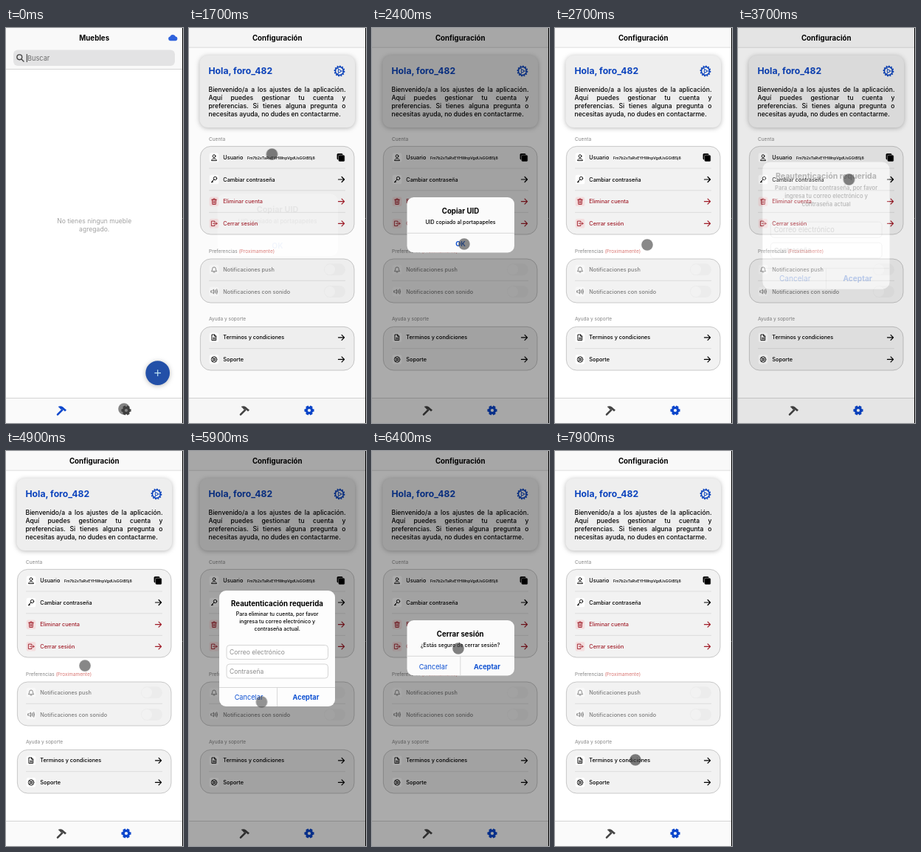
Write an HTML page that moves like this. It is 240 by 532 pixels and loops after 8000 ms.

```html
<!DOCTYPE html>
<html lang="es">
<head>
<meta charset="utf-8">
<title>Muebles</title>
<style>
@property --s { syntax: "<number>"; inherits: true; initial-value: 1; }
html, body { margin: 0; width: 100%; height: 100%; overflow: hidden; background: #fff; }
svg.stage { display: block; width: 240px; height: 532px; font-family: Inter, Roboto, "Liberation Sans", sans-serif; }
.title { font-size: 9.7px; font-weight: 650; text-anchor: middle; }
.empty { font-size: 8.6px; fill: #a2a2a2; text-anchor: middle; }
.hello { font-size: 12.2px; font-weight: 700; fill: #0b43bd; }
.row { font-size: 7.3px; font-weight: 500; }
.uid { font-size: 5.25px; font-weight: 500; }
.sect { font-size: 6.5px; fill: #858585; }
.msg { font-size: 7.05px; font-weight: 500; text-anchor: middle; }
.hint { font-size: 8.5px; fill: #8c8c8c; }
.btn { font-size: 9.2px; fill: #0d50d2; text-anchor: middle; }
.bold { font-weight: 700; }
.red { color: #a01c28; fill: #a01c28; }
.off { opacity: .48; }
.line { fill: none; stroke: currentColor; stroke-width: .9; stroke-linecap: round; stroke-linejoin: round; }
.card { fill: #f2f2f2; stroke: #bcbcbc; stroke-width: .8; }
.sep { stroke: #d9d9d9; stroke-width: .8; }
.tile { fill: #fff; }
.red .tile { fill: #f3dedf; }
.field { fill: #fff; stroke: #cbcbcb; stroke-width: .8; }
.intro { position: relative; font: 450 8.6px/10.7px Inter, Roboto, "Liberation Sans", sans-serif; color: #000; }
.intro div { white-space: nowrap; text-align-last: justify; }
.intro div:last-child { text-align-last: left; }
.lift { filter: drop-shadow(0 1px 3px rgba(0, 0, 0, .28)); }

.home, .config, .modal, .touch { animation: 8s linear infinite; }
.home { animation-name: home; animation-timing-function: step-end; }
.config { animation-name: config; animation-timing-function: step-end; }
@keyframes home { 0% { visibility: visible } 1.2%, 100% { visibility: hidden } }
@keyframes config { 0% { visibility: hidden } 1.2%, 100% { visibility: visible } }

.modal { opacity: 0; }
.box { transform-origin: 120px 265px; transform: scale(var(--s)); }
.copy { animation-name: copy; }
.pass { animation-name: pass; }
.drop { animation-name: drop; }
.exit { animation-name: exit; }
@keyframes copy {
  0%, 21.1% { opacity: 0; --s: 1.13 }
  24.4%, 31.8% { opacity: 1; --s: 1 }
  33.5%, 100% { opacity: 0; --s: 1 }
}
@keyframes pass {
  0%, 45.6% { opacity: 0; --s: 1.13 }
  48.2%, 57.5% { opacity: 1; --s: 1 }
  59.4%, 100% { opacity: 0; --s: 1 }
}
@keyframes drop {
  0%, 66.8% { opacity: 0; --s: 1.13 }
  69.4%, 74.4% { opacity: 1; --s: 1 }
  76%, 100% { opacity: 0; --s: 1 }
}
@keyframes exit {
  0%, 77.4% { opacity: 0; --s: 1.13 }
  79.9%, 90.6% { opacity: 1; --s: 1 }
  92.3%, 100% { opacity: 0; --s: 1 }
}

.touch { fill: #3c3c3c; animation-name: touch; animation-timing-function: ease-in-out; }
@keyframes touch {
  0%, 4% { transform: translate(160px, 513px); opacity: .62 }
  18%, 23% { transform: translate(112.5px, 170px); opacity: .66 }
  30.5%, 34.5% { transform: translate(125px, 292px); opacity: .6 }
  43.5%, 49.5% { transform: translate(150.5px, 204px); opacity: .64 }
  55.5%, 58.5% { transform: translate(82px, 331px); opacity: .6 }
  64.5%, 68.5% { transform: translate(140px, 234px); opacity: .64 }
  72.8%, 74.6% { transform: translate(98.5px, 338px); opacity: .55 }
  77%, 81.5% { transform: translate(117px, 266px); opacity: .64 }
  88%, 91.5% { transform: translate(85px, 291px); opacity: .6 }
  98%, 100% { transform: translate(109px, 416px); opacity: .66 }
}
</style>
</head>
<body>
<svg class="stage" viewBox="0 0 240 532">
  <defs>
    <g id="arrow" fill="none" stroke="currentColor" stroke-width="1.2" stroke-linecap="round" stroke-linejoin="round">
      <path d="M-4 0H4M.6-3.5L4.1 0L.6 3.5"/>
    </g>
    <rect id="tile" x="-6.3" y="-6.3" width="12.6" height="12.6" rx="2.6"/>
    <g id="cog" fill="none" stroke="currentColor">
      <circle r="3.7" stroke-width="3.2"/>
      <circle r="5.4" stroke-width="2.4" pathLength="12" stroke-dasharray="1.25 .75" stroke-dashoffset=".62"/>
    </g>
    <g id="hammer">
      <path d="M1.3-.6L-5 5.6" stroke="currentColor" stroke-width="2.6" stroke-linecap="round"/>
      <path d="M-4.4-4.9Q-1.2-6.8 2.3-4.6L4.5-2.6L7-.5L5 1.5L2.9-.4L1.2-1.9L-.4-.9L-2.2-2.9Q-3-4-4.4-4.9Z" fill="currentColor"/>
    </g>
    <g id="user" class="line">
      <circle cy="-1.9" r="1.9"/><path d="M-3.4 3.7C-3.2.6 3.2.6 3.4 3.7Z"/>
    </g>
    <g id="key" class="line">
      <circle cx="1.5" cy="-1.5" r="2.2"/><path d="M0 0L-3.6 3.6M-3.6 3.6H-2M-2 2V3.2"/>
    </g>
    <g id="trash" class="line">
      <path d="M-3.3-2.5H3.3M-1.1-2.5V-3.7H1.1V-2.5M-2.6-2.5L-2.2 3.8H2.2L2.6-2.5M-.8-.8V2.3M.8-.8V2.3"/>
    </g>
    <g id="leave" class="line">
      <path d="M.8-1.6V-3.2H-3.6V3.2H.8V1.6M-1.3 0H4M2.5-1.6L4 0L2.5 1.6"/>
    </g>
    <g id="bell" class="line">
      <path d="M-3.3 2.1Q-2.3 1-2.3-1A2.3 2.3 0 0 1 2.3-1Q2.3 1 3.3 2.1ZM-.9 3.7H.9"/>
    </g>
    <g id="sound" class="line">
      <path d="M-4-1.1H-2.5L-.5-2.9V2.9L-2.5 1.1H-4ZM1-1.4Q1.9 0 1 1.4M2.4-2.4Q4 0 2.4 2.4M3.8-3.3Q5.8 0 3.8 3.3"/>
    </g>
    <g id="doc" class="line">
      <path d="M-2.7-3.8H.6L2.7-1.6V3.8H-2.7ZM.6-3.8V-1.6H2.7M-1.3.5H1.3M-1.3 2.1H1.3"/>
    </g>
    <g id="help" class="line">
      <circle r="3.7"/><circle r="1.5"/><path d="M-2.6-2.6L-1.1-1.1M2.6-2.6L1.1-1.1M-2.6 2.6L-1.1 1.1M2.6 2.6L1.1 1.1"/>
    </g>
    <g id="switch">
      <rect x="-14.5" y="-8" width="29" height="16" rx="8" fill="#e6e6e6"/>
      <circle cx="-6.5" r="7" fill="#f4f4f4"/>
    </g>
    <g id="bar">
      <rect y="498" width="240" height="34" fill="#fafafa"/>
      <path d="M0 498.5H240" stroke="#d4d4d4"/>
    </g>
    <g id="choices">
      <text class="btn" x="81" y="334.5">Cancelar</text>
      <text class="btn bold" x="158.5" y="334.5">Aceptar</text>
    </g>
    <g id="login">
      <rect x="41" y="188" width="157" height="156" rx="9" fill="#fdfdfd"/>
      <text class="title" x="119.5" y="208.6">Reautenticación requerida</text>
      <rect class="field" x="51" y="261.5" width="137.5" height="19" rx="4"/>
      <rect class="field" x="51" y="287" width="137.5" height="19" rx="4"/>
      <text class="hint" x="55" y="274.2">Correo electrónico</text>
      <text class="hint" x="55" y="299.6">Contraseña</text>
      <path d="M41 318.5H198M119.5 318.5V344" stroke="#d0d0d0" stroke-width=".8"/>
      <use href="#choices"/>
    </g>
    <rect id="dim" width="240" height="532" fill="#000" opacity=".33"/>
    <rect id="alert" x="47.5" y="228" width="145.5" height="74.5" rx="9" fill="#fbfbfb"/>
  </defs>

  <rect width="240" height="532" fill="#fff"/>

  <g class="home">
    <rect width="240" height="55" fill="#f9f9f9"/>
    <path d="M0 55.5H240" stroke="#d6d6d6"/>
    <text class="title" x="119.7" y="16.5">Muebles</text>
    <path d="M222.8 17.3A3 3 0 0 1 222.4 11.4A4.2 4.2 0 0 1 230 11.6A2.9 2.9 0 0 1 230.2 17.3Z" fill="#2f62dc"/>
    <rect x="10" y="29.5" width="219" height="21.5" rx="6" fill="#e3e3e4"/>
    <g fill="none" stroke="#444" stroke-width="1.4" stroke-linecap="round">
      <circle cx="18.3" cy="39.3" r="3.4"/><path d="M21 42L24 45"/>
    </g>
    <text x="29" y="43.8" font-size="9.2" fill="#6c6c6c">Buscar</text>
    <path d="M28.3 35V46" stroke="#333"/>
    <text class="empty" x="119.7" y="263.4">No tienes ningun mueble</text>
    <text class="empty" x="119.7" y="274.2">agregado.</text>
    <circle class="lift" cx="205.7" cy="464.6" r="16.4" fill="#2350a8"/>
    <path d="M201.4 464.6H210M205.7 460.3V468.9" stroke="#bfe3f2" stroke-width="1.2"/>
    <use href="#bar"/>
    <use href="#hammer" x="75" y="515" color="#0d47cc"/>
    <use href="#cog" x="163" y="515" color="#444"/>
  </g>

  <g class="config">
    <rect width="240" height="26" fill="#f9f9f9"/>
    <path d="M0 26.2H240" stroke="#d6d6d6" stroke-width=".8"/>
    <text class="title" x="119.7" y="16.5">Configuración</text>

    <rect class="lift" x="14.5" y="37" width="210.5" height="97" rx="11" fill="#eee"/>
    <text class="hello" x="26.5" y="62.4">Hola, foro_482</text>
    <g transform="translate(204 58)" fill="none" stroke="#0b43bd">
      <circle r="5.5" stroke-width="1.5"/>
      <circle r="6.7" stroke-width="1.4" pathLength="24" stroke-dasharray="1.1 .9"/>
      <circle r="1.8" stroke-width="1"/>
      <path d="M2 0H5M-1-1.7L-2.5-4.3M-1 1.7L-2.5 4.3" stroke-width="1.1"/>
    </g>
    <foreignObject x="26.5" y="78.4" width="186" height="46">
      <div class="intro" xmlns="http://www.w3.org/1999/xhtml">
        <div>Bienvenido/a a los ajustes de la aplicación.</div>
        <div>Aquí puedes gestionar tu cuenta y</div>
        <div>preferencias. Si tienes alguna pregunta o</div>
        <div>necesitas ayuda, no dudes en contactarme.</div>
      </div>
    </foreignObject>

    <text class="sect" x="27" y="151.5">Cuenta</text>
    <rect class="card" x="15.4" y="159.4" width="208.6" height="118.6" rx="14"/>
    <path class="sep" d="M27 189H212M27 218.8H212M27 248.4H212"/>
    <g transform="translate(34 174.5)">
      <use href="#tile" class="tile"/><use href="#user"/>
      <text class="row" x="12.3" y="2.6">Usuario</text>
      <text class="uid" x="45" y="2">Fm7b2xTaRvEYHWnpVgdUsGGtB5j8</text>
      <rect x="166.6" y="-5.5" width="8" height="8.4" rx="1.6"/>
      <rect x="168.6" y="-3.4" width="8.6" height="8.8" rx="1.6" stroke="#f2f2f2" stroke-width=".5"/>
    </g>
    <g transform="translate(34 204)">
      <use href="#tile" class="tile"/><use href="#key"/>
      <text class="row" x="12.3" y="2.6">Cambiar contraseña</text><use href="#arrow" x="172.5"/>
    </g>
    <g class="red" transform="translate(34 233.7)">
      <use href="#tile" class="tile"/><use href="#trash"/>
      <text class="row" x="12.3" y="2.6">Eliminar cuenta</text><use href="#arrow" x="172.5"/>
    </g>
    <g class="red" transform="translate(34 263.3)">
      <use href="#tile" class="tile"/><use href="#leave"/>
      <text class="row" x="12.3" y="2.6">Cerrar sesión</text><use href="#arrow" x="172.5"/>
    </g>

    <text class="sect" x="27" y="302.5">Preferencias <tspan fill="#d97672">(Proximamente)</tspan></text>
    <rect class="card" x="15.4" y="311" width="208.6" height="59" rx="14"/>
    <path class="sep" d="M27 340.3H212"/>
    <g class="off" transform="translate(34 325.3)">
      <use href="#tile" class="tile"/><use href="#bell"/>
      <text class="row" x="12.3" y="2.6">Notificaciones push</text><use href="#switch" x="163.5"/>
    </g>
    <g class="off" transform="translate(34 355)">
      <use href="#tile" class="tile"/><use href="#sound"/>
      <text class="row" x="12.3" y="2.6">Notificaciones con sonido</text><use href="#switch" x="163.5"/>
    </g>

    <text class="sect" x="27" y="394.3">Ayuda y soporte</text>
    <rect class="card" x="15.4" y="402.4" width="208.6" height="58.6" rx="14"/>
    <path class="sep" d="M27 431.7H212"/>
    <g transform="translate(34 416.8)">
      <use href="#tile" class="tile"/><use href="#doc"/>
      <text class="row" x="12.3" y="2.6">Terminos y condiciones</text><use href="#arrow" x="172.5"/>
    </g>
    <g transform="translate(34 446.4)">
      <use href="#tile" class="tile"/><use href="#help"/>
      <text class="row" x="12.3" y="2.6">Soporte</text><use href="#arrow" x="172.5"/>
    </g>

    <use href="#bar"/>
    <use href="#hammer" x="75" y="515" color="#444"/>
    <use href="#cog" x="163" y="515" color="#0d47cc"/>
  </g>

  <g class="modal copy">
    <use href="#dim"/>
    <g class="box">
      <use href="#alert"/>
      <text class="title" x="120" y="249.8">Copiar UID</text>
      <text class="msg" x="120" y="263.6">UID copiado al portapapeles</text>
      <path d="M47.5 276.3H193" stroke="#d0d0d0" stroke-width=".8"/>
      <text class="btn bold" x="120" y="293.7">OK</text>
    </g>
  </g>

  <g class="modal pass">
    <use href="#dim"/>
    <g class="box">
      <use href="#login"/>
      <text class="msg" x="119.7" y="222.2">Para cambiar tu contraseña, por favor</text>
      <text class="msg" x="119.7" y="232.3">ingresa tu correo electrónico y</text>
      <text class="msg" x="119.7" y="242.3">contraseña actual</text>
    </g>
  </g>

  <g class="modal drop">
    <use href="#dim"/>
    <g class="box">
      <use href="#login"/>
      <text class="msg" x="119.7" y="222.2">Para eliminar tu cuenta, por favor</text>
      <text class="msg" x="119.7" y="232.3">ingresa tu correo electrónico y</text>
      <text class="msg" x="119.7" y="242.3">contraseña actual.</text>
    </g>
  </g>

  <g class="modal exit">
    <use href="#dim"/>
    <g class="box">
      <use href="#alert"/>
      <text class="title" x="119.7" y="249.8">Cerrar sesión</text>
      <text class="msg" x="119.7" y="263.6">¿Estás seguro de cerrar sesión?</text>
      <path d="M47.5 276.3H193M119.8 276.3V302.5" stroke="#d0d0d0" stroke-width=".8"/>
      <text class="btn" x="83" y="293.9">Cancelar</text>
      <text class="btn bold" x="156" y="293.9">Aceptar</text>
    </g>
  </g>

  <circle class="touch" r="7.8"/>
  <path d="M239.5 0V532" stroke="#000"/>
</svg>
</body>
</html>
```
